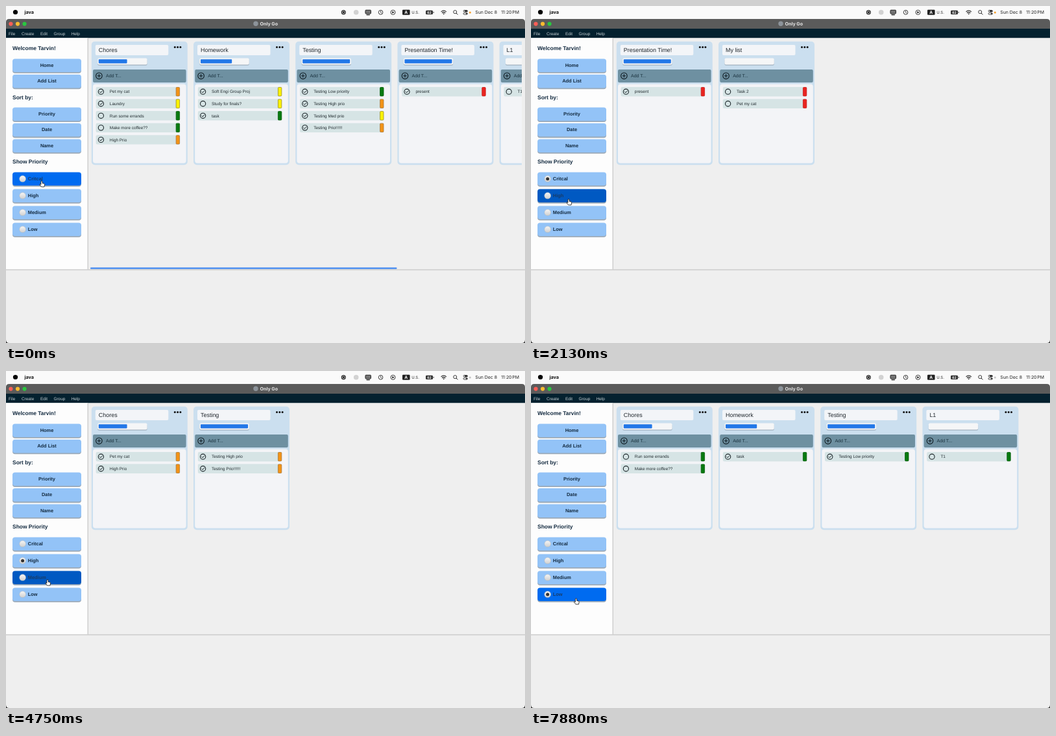
Animation of 800x520 px, one loop 8000 ms. Source, as an HTML page:

```html
<!DOCTYPE html>
<html lang="en">
<head>
<meta charset="utf-8">
<title>To-do board</title>
<style>
html, body { margin: 0; width: 100%; height: 100%; overflow: hidden; background: #efefef; }
svg { display: block; width: 800px; height: 520px; text-rendering: geometricPrecision; }
text { font-family: "Liberation Sans", Arial, sans-serif; white-space: pre; }
.ui { font-family: Inter, sans-serif; }
.b { font-weight: 700; }
</style>
</head>
<body>
<svg viewBox="0 0 800 520">
  <defs>
    <linearGradient id="knob" x2="0" y2="1"><stop stop-color="#f6f6f6"/><stop offset="1" stop-color="#cfcfcf"/></linearGradient>
    <clipPath id="pane"><path d="M127 50H795V406H127z"/></clipPath>
  </defs>
  <g id="frame"></g>
  <g id="board" clip-path="url(#pane)"></g>
  <g id="radios"></g>
  <circle id="dot" cx="715.3" cy="10" r="1.6"/>
  <path id="hand" fill="#fff" stroke="#111" stroke-width=".8" stroke-linejoin="round"
    d="M-1.1 1a1.1 1.1 0 0 1 2.2 0V3.4L3.6 4q1.2.4 1 1.7L4 9H-.4L-2.9 6q-.7-1.3.6-1.3L-1.1 5.5z"/>
</svg>
<script>
const LOOP = 8000, INK = '#142b40';
const $ = id => document.getElementById(id);
const rect = (x, y, w, h, fill, r = 0, more = '') =>
  `<rect x="${x}" y="${y}" width="${w}" height="${h}" rx="${r}" fill="${fill}" ${more}/>`;
const circle = (x, y, r, fill, more = '') => `<circle cx="${x}" cy="${y}" r="${r}" fill="${fill}" ${more}/>`;
const line = (d, color, w = 1) =>
  `<path d="${d}" fill="none" stroke="${color}" stroke-width="${w}" stroke-linecap="round" stroke-linejoin="round"/>`;
const text = (x, y, size, s, fill = INK, cls = '', more = '') =>
  `<text x="${x}" y="${y}" font-size="${size}" fill="${fill}" class="${cls}" ${more}>${s}</text>`;
const middle = 'text-anchor="middle"', right = 'text-anchor="end"';

// priority: 0 critical, 1 high, 2 medium, 3 low
const CHIPS = ['#e92420', '#f39315', '#fbf203', '#087a10'];
const EDGES = ['#c81b18', '#a8763a', '#9a8f20', '#055c0a'];
const LEVELS = ['Critcal', 'High', 'Medium', 'Low'];
const LISTS = [
  ['Chores', .6, [['Pet my cat', 1, 1], ['Laundry', 2, 1], ['Run some errands', 3, 0], ['Make more coffee??', 3, 0], ['High Prio', 1, 1]]],
  ['Homework', .66, [['Soft Engi Group Proj', 2, 1], ['Study for finals?', 2, 0], ['task', 3, 1]]],
  ['Testing', 1, [['Testing Low priority', 3, 1], ['Testing High prio', 1, 1], ['Testing Med prio', 2, 1], ['Testing Prio!!!!!!', 1, 1]]],
  ['Presentation Time!', 1, [['present', 0, 1]]],
  ['L1', 0, [['T1', 3, 0]]],
  ['My list', 0, [['Task 1', 2, 0], ['Task 2', 0, 0], ['Pet my cat', 0, 0]]],
];
// pointer rests at x, y: arrives between from and to, pressed at down, released at up
const CLICKS = [
  { x: 55, y: 270, from: 0, to: 0, down: 250, up: 380 },
  { x: 58, y: 298, from: 1300, to: 1800, down: 2050, up: 2250 },
  { x: 64, y: 322, from: 4000, to: 4500, down: 4680, up: 4880 },
  { x: 69.5, y: 351, from: 6600, to: 7250, down: 7630, up: 7880 },
];

const button = (y, fill) => rect(10, y + 1.4, 106, 21, '#9aa9b8', 4) + rect(10, y, 106, 20.6, fill, 4);

function menuBar() {
  const k = '#222';
  return rect(0, 0, 800, 26, '#fafafa') + circle(14.5, 9.5, 3.6, '#000')
    + text(28.5, 12.2, 7.2, 'java', '#111', 'ui b')
    + circle(520.3, 9.7, 2.9, 'none', `stroke="${k}" stroke-width="1.2"`) + rect(518.8, 8.2, 3, 3, k, .6)
    + circle(539.7, 9.7, 3.8, '#d2d2d2')
    + rect(554, 6.3, 8.4, 5.6, '#777', .8, `stroke="${k}"`) + line('M556 13.6h4.4', k, 1.2)
    + circle(577.6, 9.8, 3.3, 'none', `stroke="${k}" stroke-width=".9"`) + line('M577.6 7.8v2.2l1.4.8', k, .8)
    + circle(596.5, 9.8, 3.5, 'none', `stroke="${k}" stroke-width=".9"`) + '<path d="M595.4 8v3.6l3-1.8z"/>'
    + rect(611, 5.8, 11.6, 8, k, 1.3) + text(616.8, 12.2, 6.5, 'A', '#fff', 'ui b', middle)
    + text(625.3, 12.3, 6, 'U.S.', k, 'ui')
    + rect(647, 6.7, 11, 6.4, '#333', 1.6) + rect(658.6, 8.7, 1, 2.4, '#555', .5)
    + text(652.5, 11.7, 5, '62', '#fff', 'ui b', middle)
    + line('M671 8.6q3.7-3 7.4 0M672.5 10.5q2.2-1.8 4.4 0', k, 1.2) + circle(674.7, 12.2, .9, k)
    + circle(692.2, 9.2, 2.5, 'none', `stroke="${k}" stroke-width=".9"`) + line('M694.2 11.2l1.9 1.9', k)
    + rect(704.7, 6.3, 7, 3, k, 1.5) + circle(706.3, 7.8, .9, '#fff')
    + rect(705, 10.6, 6.4, 2.5, 'none', 1.2, `stroke="${k}" stroke-width=".8"`) + circle(709.9, 11.8, 1, k)
    + text(757, 12.2, 6.9, 'Sun Dec 8', '#222', 'ui', right)
    + text(791, 12.2, 6.9, '11:20 PM', '#222', 'ui', right + ' word-spacing="-1"');
}

function frame() {
  let s = menuBar()
    + '<path d="M0 36V25q0-5 5-5H795q5 0 5 5V36z" fill="#5b5b5b"/>'
    + circle(7.4, 27.6, 3.1, '#fc5f57') + circle(18, 27.6, 3.1, '#fdbc2f') + circle(28.5, 27.6, 3.1, '#29c740')
    + circle(385, 27.3, 3.7, '#8d949b') + text(391.5, 29.9, 7.1, 'Only Go', '#e6e6e6', 'ui b')
    + rect(0, 35, 800, 14.5, '#04212f');
  [['File', 4], ['Create', 24], ['Edit', 53], ['Group', 73.5], ['Help', 100.7]]
    .forEach(([label, x]) => s += text(x, 44.6, 6.4, label, '#c9d1d5'));
  s += rect(0, 49.5, 800, 470.5, '#efefef') + rect(0, 49.5, 126, 357, '#fdfdfd')
    + rect(125.6, 49.5, 1.2, 357, '#c6c6c6') + rect(0, 406.4, 800, 1.2, '#c6c6c6')
    + '<path d="M0 515q0 5 5 5H0zM800 515q0 5-5 5h5z" fill="#333"/>';
  [['Welcome Tarvin!', 68.4], ['Sort by:', 143.6], ['Show Priority', 243.4]]
    .forEach(([label, y]) => s += text(10, y, 8.45, label, INK, 'b'));
  [['Home', 81.4], ['Add List', 105.8], ['Priority', 156.6], ['Date', 181], ['Name', 205.4]]
    .forEach(([label, y]) => s += button(y, '#93c3f7') + text(63, y + 12.2, 7.4, label, INK, 'b', middle));
  return s;
}

function task([name, level, done], i) {
  const y = 132.2 + i * 18.55;
  return rect(6.8, y - 7.2, 128, 14.4, '#d6e4e5', 2)
    + circle(14.6, y, 4.1, 'none', 'stroke="#1d272b" stroke-width="1.1"')
    + (done ? line(`M12.6 ${y + .1}l1.5 1.5 2.7-3`, '#1d272b') : '')
    + text(28, y + 2.2, 6.45, name, '#222c30')
    + rect(130.4, y - 6.7, 5.4, 13.4, CHIPS[level], 1, `stroke="${EDGES[level]}" stroke-width=".8"`);
}

function column([title, progress, tasks], i) {
  return `<g transform="translate(${131.8 + i * 157.2})">`
    + rect(0, 54.8, 148, 190.4, '#cbdfef', 5)
    + rect(6, 60, 112.5, 16, '#f3f5f8', 2) + text(11, 71.2, 8.95, title, '#20272d')
    + [128.5, 132.8, 137.1].map(x => circle(x, 63.4, 1.5, '#111')).join('')
    + rect(9.4, 81.8, 76.4, 10, '#a3b2c0', 2.5) + rect(9.4, 80.6, 76.4, 9.8, '#f5f6f7', 2.5)
    + (progress ? rect(11, 82.2, 73 * progress, 6.2, '#2277e8', .8) : '')
    + rect(2.2, 98, 143.6, 20, '#6e90a1', 2)
    + circle(11.6, 107.8, 4.8, 'none', 'stroke="#101d24" stroke-width="1.1"')
    + line('M9.2 107.8h4.8M11.6 105.4v4.8', '#101d24') + text(22.2, 110.4, 7, 'Add T...', '#1b333f')
    + rect(2.2, 120.5, 143.6, 122, '#f3f4f7', 4)
    + tasks.map(task).join('') + '</g>';
}

function board(level) {
  if (level < 0) return LISTS.map(column).join('') + rect(130, 403.4, 472.5, 2.4, '#3f86f0', 1.2);
  return LISTS.map(([title, p, tasks]) => [title, p, tasks.filter(t => t[1] === level)])
    .filter(list => list[2].length).map(column).join('');
}

function radios(level, hover, pressed) {
  return LEVELS.map((label, i) => {
    const y = 256.4 + 26 * i, on = i === hover;
    return button(y, on ? (pressed ? '#0059c2' : '#006bf0') : '#93c3f7')
      + circle(25.6, y + 10.3, 4.9, 'url(#knob)', 'stroke="#a9b4bf" stroke-width=".5"')
      + (i === level ? circle(25.6, y + 10.3, 2.5, '#333') : '')
      + text(33.8, y + 12.6, 7.4, label, on ? '#183c68' : INK, 'b');
  }).join('');
}

function pointer(t) {
  let { x, y } = CLICKS[0];
  for (const c of CLICKS.slice(1)) {
    const u = Math.min(1, Math.max(0, (t - c.from) / (c.to - c.from))), e = u * u * (3 - 2 * u);
    x += (c.x - x) * e;
    y += (c.y - y) * e;
  }
  return [x, y];
}

const shown = {};
function put(id, key, make) {
  if (shown[id] === key) return;
  shown[id] = key;
  $(id).innerHTML = make();
}

function draw(now) {
  const t = now % LOOP, [x, y] = pointer(t);
  const level = CLICKS.filter(c => t >= c.up).length - 1;
  const pressed = CLICKS.some(c => t >= c.down && t < c.up);
  const row = Math.floor((y - 256) / 26);
  const hover = y - 256 - row * 26 < 22 ? row : -1;
  put('board', level, () => board(level));
  put('radios', [level, hover, pressed].join(), () => radios(level, hover, pressed));
  $('hand').setAttribute('transform', `translate(${x} ${y})`);
  $('dot').setAttribute('fill', t < 3500 ? '#f5a02c' : '#c4c4c4');
  requestAnimationFrame(draw);
}

$('frame').innerHTML = frame();
draw(0);
</script>
</body>
</html>
```
